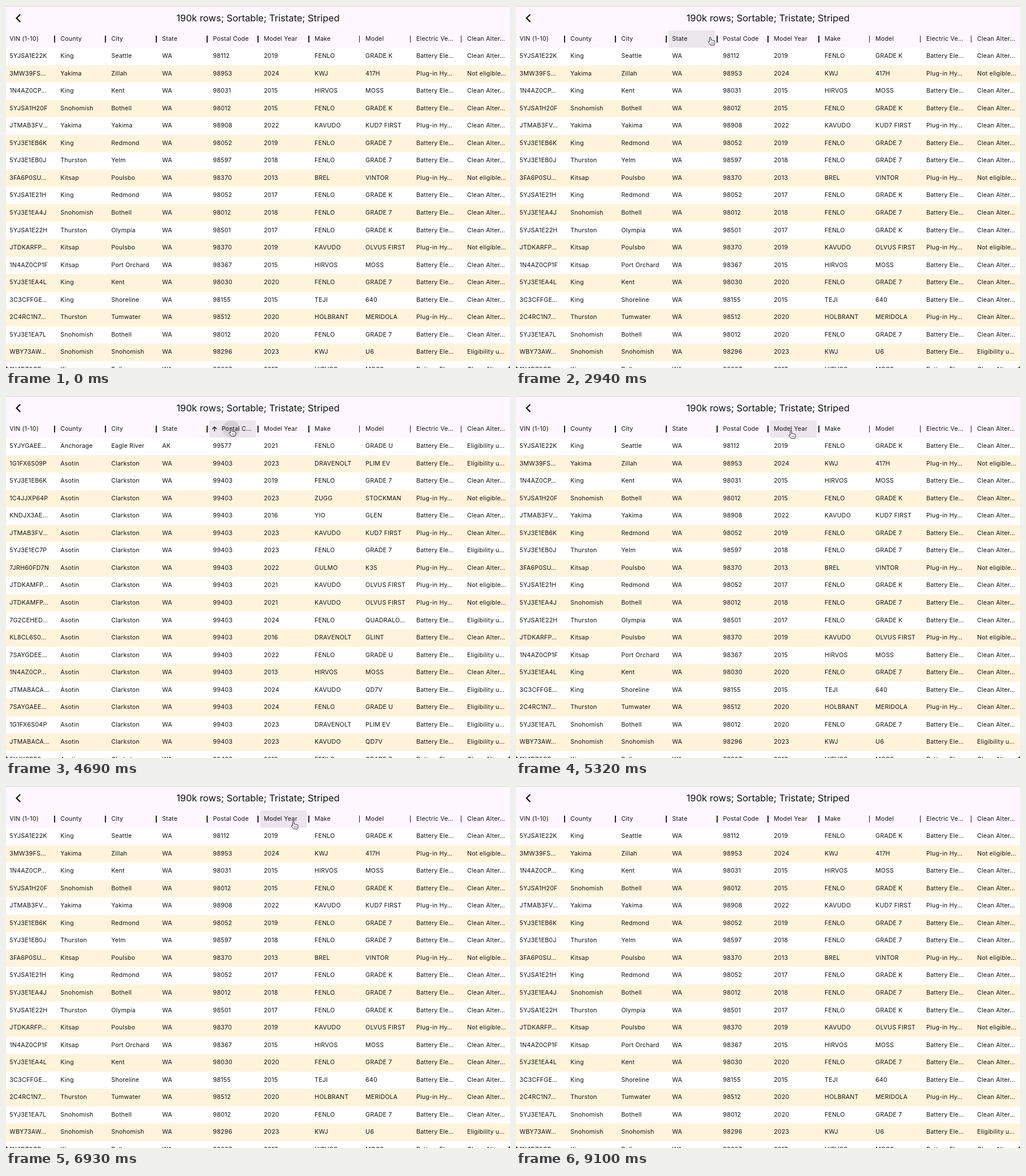
Write an HTML page that moves like this. It is 882x635 px and loops after 9.8 s.

```html
<!DOCTYPE html>
<html lang="en">
<head>
<meta charset="utf-8">
<title>Sortable table</title>
<style>
  html, body { margin: 0; width: 100%; height: 100%; overflow: hidden; background: #222; }
  #stage {
    position: relative; width: 882px; height: 635px; overflow: hidden;
    background: #fff; border-radius: 0 0 5px 5px; color: #111;
    font: 10.6px Inter, Roboto, sans-serif; letter-spacing: .2px;
  }
  #stage div, #stage span, #stage svg { position: absolute; white-space: pre; }
  #bar { left: 0; top: 0; width: 882px; height: 73px; background: #fef7ff; box-shadow: inset 0 1px #d8d3da; }
  #title { left: 0; top: 6px; width: 882px; line-height: 31px; text-align: center; font-size: 16.4px; letter-spacing: 0; }
  #hover { top: 43px; width: 81.3px; height: 30px; overflow: hidden; background: #ebe5ec; }
  #ripple { width: 30px; height: 30px; border-radius: 50%; background: rgba(29, 27, 32, .1); }
  .head { top: 43px; line-height: 30px; overflow: hidden; text-overflow: ellipsis; }
  .sep { top: 52px; width: 1.3px; height: 12px; background: #222; }
  .row { left: 0; width: 882px; height: 30.53px; line-height: 30.53px; }
  .row:nth-child(even) { background: #fff4db; }
  svg { left: 0; top: 0; overflow: visible; }
</style>
</head>
<body>
<div id="stage">
  <div id="bar"></div>
  <div id="hover"><div id="ripple"></div></div>
  <div id="title">190k rows; Sortable; Tristate; Striped</div>
  <svg width="882" height="635" style="z-index:2" fill="none" stroke-linejoin="round">
    <path d="M25 14.7 18.4 21.3 25 27.9" stroke="#111" stroke-width="2.2" stroke-linejoin="miter"/>
    <path id="sortArrow" d="M0 4V-3.7M-3.8 0 0-3.8 3.8 0" stroke="#111" stroke-width="1.3" stroke-linejoin="miter"/>
    <g id="hand" fill="#fff" stroke="#111" stroke-width=".9">
      <path d="M-1.3 8V1.2A1.25 1.25 0 0 1 1.2 1.2V5Q3.4 4.2 3.6 5.4 5.6 4.7 5.8 6 8 5.5 8 7.3V9.5Q8 11 7 13.3H.3Q-.5 11.5-3.4 9-4.2 7.6-2.9 7.2-2.2 7.1-1.3 8Z"/>
      <path d="M1.6 8.6V11M3.5 8.6V11M5.4 8.6V11" stroke-width=".6"/>
    </g>
    <path id="pointer" d="M0 0V12L2.8 9.4 4.6 13.4 6.4 12.6 4.6 8.8H8.4Z" fill="#111" stroke="#fff" stroke-width=".9"/>
  </svg>
</div>
<script>
const LOOP = 9800, TICK = 70, COL = 88.97, ROW = 30.53, TOP = 73.2, ROWS = 19;
const $ = id => document.getElementById(id);
const stage = $('stage');

const heads = ['VIN (1-10)', 'County', 'City', 'State', 'Postal Code', 'Model Year', 'Make', 'Model', 'Electric Ve…', 'Clean Alter…'];
const cars = {
  s: 'FENLO/GRADE K', d: 'FENLO/GRADE 7', y: 'FENLO/GRADE U', c: 'FENLO/QUADRALO…', o: 'FENLO/SPRINTAL',
  b: 'KWJ/417H', i: 'KWJ/U6', l: 'HIRVOS/MOSS', r: 'KAVUDO/KUD7 FIRST', p: 'KAVUDO/OLVUS FIRST',
  z: 'KAVUDO/QD7V', w: 'KAVUDO/KUD7', f: 'BREL/VINTOR', g: 'BREL/DRIMER', t: 'TEJI/640',
  h: 'HOLBRANT/MERIDOLA', e: 'DRAVENOLT/PLIM EV', k: 'DRAVENOLT/GLINT', u: 'DRAVENOLT/K-30 PICKUP',
  j: 'ZUGG/STOCKMAN', n: 'YIO/GLEN', v: 'GULMO/K35', a: 'AFUNO/XQR', m: 'AGLO VEN…/VIRELO'
};
const labels = { B: 'Battery Ele…', P: 'Plug-in Hy…', C: 'Clean Alter…', N: 'Not eligible…', E: 'Eligibility u…' };

// Fields: vin, county, city, zip, year, car, flags, state. An empty field repeats the row above.
function parse(text) {
  let last = ['', '', '', '', '', '', '', 'WA'];
  return text.trim().split('\n').map(line => {
    const f = line.split(',');
    return last = last.map((old, i) => f[i] || old);
  });
}

const base = parse(`
5YJSA1E22K,King,Seattle,98112,2019,s,BC
3MW39FS…,Yakima,Zillah,98953,2024,b,PN
1N4AZ0CP…,King,Kent,98031,2015,l,BC
5YJSA1H20F,Snohomish,Bothell,98012,2015,s
JTMAB3FV…,Yakima,Yakima,98908,2022,r,PC
5YJ3E1EB6K,King,Redmond,98052,2019,d,BC
5YJ3E1EB0J,Thurston,Yelm,98597,2018
3FA6P0SU…,Kitsap,Poulsbo,98370,2013,f,PN
5YJSA1E21H,King,Redmond,98052,2017,s,BC
5YJ3E1EA4J,Snohomish,Bothell,98012,2018,d
5YJSA1E22H,Thurston,Olympia,98501,2017,s
JTDKARFP…,Kitsap,Poulsbo,98370,2019,p,PN
1N4AZ0CP1F,Kitsap,Port Orchard,98367,2015,l,BC
5YJ3E1EA4L,King,Kent,98030,2020,d
3C3CFFGE…,King,Shoreline,98155,2015,t
2C4RC1N7…,Thurston,Tumwater,98512,2020,h,PC
5YJ3E1EA7L,Snohomish,Bothell,98012,2020,d,BC
WBY73AW…,Snohomish,Snohomish,98296,2023,i,BE
1N4BZ0CP…,King,Bellevue,98007,2017,l,BC`);

const zipDown = parse(`
5YJYGAEE…,Anchorage,Eagle River,99577,2021,y,BE,AK
1G1FX6S09P,Asotin,Clarkston,99403,2023,e,,WA
5YJ3E1EB6K,,,,2019,d,BC
1C4JJXP64P,,,,2023,j,PN
KNDJX3AE…,,,,2016,n,BC
JTMAB3FV…,,,,2023,r,PC
5YJ3E1EC7P,,,,,d,BE
7JRH60FD7N,,,,2022,v,PC
JTDKAMFP…,,,,2021,p,PN
JTDKAMFP…
7G2CEHED…,,,,2024,c,BE
KL8CL6S0…,,,,2016,k,BC
7SAYGDEE…,,,,2022,y,BE
1N4AZ0CP…,,,,2013,l,BC
JTMABACA…,,,,2024,z,BE
7SAYGAEE…,,,,,y
1G1FX6S04P,,,,2023,e
JTMABACA…,,,,,z
5YJXCBE2…,,,,2018,d,BC`);

const yearUp = parse(`
1GCDE14H…,Snohomish,Marysville,98270,1997,u,BC
1FTZR1078W,Clallam,Sequim,98382,1998,g
1FTZR0812X,Pierce,Graham,98338,1999
1FTZR0812X,Skagit,Mount Vern…,98274
1FTZR0819X,Whatcom,Deming,98244
1FTZR0813X,Pierce,Graham,98338
1FTZR0818X,San Juan,Eastsound,98245
1FTZR0879Y,Whatcom,Everson,98247,2000
1FTZR0816Y,King,Shoreline,98133
1FTZR0813Y,Whatcom,Everson,98247
1FTZR0817Y,King,Seattle,98117
1FTZR0819Y,,Shoreline,98133
1FTZR0816Y,Thurston,Olympia,98506
1FTZR0870Y,San Juan,Friday Harb…,98250
JT3GS10V02,Clallam,Sequim,98382,2002,w
JT3GS10V32,King,Sammamish,98075
JT3GS10VX3,San Juan,Friday Harb…,98250,2003
5YJRE11B08,Kitsap,Port Orchard,98367,2008,o
5YJRE1B78…,Kitsap,Kingston,98346`);

const makeUp = parse(`
4W5KHNR…,King,Tukwila,98188,2024,a,BE
ZASPATDW…,,Bellevue,98005,,m,PC
ZASPATCW…,,Seattle,98122
ZASPATDW…
ZASPATDW…,Kitsap,Port Orchard,98366
ZASPATDW…,Snohomish,Marysville,98270
ZASPATCW…,King,Woodinville,98072
ZASPATCW…,Kitsap,Bainbridge …,98110
ZASPATDW…,King,Kirkland,98033
ZASPATCW…
ZASPATDW…,,Seattle,98115
ZASPATDW…,,,98177
ZASPATCW…,,Kirkland,98033
ZASPATCW…,,Seattle,98122
ZASPATDW…,Snohomish,Monroe,98272
ZASPATDW…,,Bothell,98012
ZASPATCW…,Clark,Ridgefield,98642
ZASPATCW…,Snohomish,Bothell,98021
ZASPATCW…,King,Kirkland,98033`);

const derive = (step, change) => base.map((_, i) => {
  const row = [...base[(i * step + 5) % ROWS]];
  change(row, i);
  return row;
});
const settle = list => {
  const places = list.split(';').map(p => p.split(','));
  return (row, i) => {
    const [county, city, zip, state] = places[Math.floor(i * places.length / ROWS)];
    Object.assign(row, { 1: county, 2: city, 3: zip, 7: state });
  };
};

const views = {
  none: base,
  '3up': derive(7, settle('Anchorage,Eagle River,99577,AK;Madison,Huntsville,35806,AL;Pulaski,Little Rock,72204,AR;Maricopa,Phoenix,85032,AZ;Pima,Tucson,85718,AZ;Alameda,Oakland,94610,CA;Orange,Irvine,92620,CA;San Diego,San Diego,92101,CA')),
  '3down': derive(5, (row, i) => { if (!i) settle('Laramie,Cheyenne,82001,WY')(row, 0); }),
  '4up': derive(4, settle('Worcester,Shrewsbury,1545,MA;New London,Groton,6340,CT;Kings,Brooklyn,11201,NY;Howard,Columbia,21044,MD;Fairfax,Fairfax,22030,VA;Wake,Raleigh,27606,NC')),
  '4down': zipDown,
  '5up': yearUp,
  '5down': derive(3, row => { row[4] = '2025'; row[5] = 'i'; row[0] = 'WBY43HD…'; row[6] = 'BE'; }),
  '6up': makeUp,
  '6down': derive(8, row => { row[5] = 'v'; row[0] = '7JRH60FD…'; row[6] = 'PC'; })
};

function add(parent, tag, cls, style, text = '') {
  const el = document.createElement(tag);
  el.className = cls;
  el.textContent = text;
  Object.assign(el.style, style);
  return parent.appendChild(el);
}
const textX = col => 6.3 + COL * col;
const px = v => v + 'px';

const tables = {};
for (const key in views) {
  const table = tables[key] = add(stage, 'div', '', {});
  views[key].forEach(([vin, county, city, zip, year, car, flags, state], i) => {
    const row = add(table, 'div', 'row', { top: px(TOP + ROW * i) });
    [vin, county, city, state, zip, year, ...cars[car].split('/'), labels[flags[0]], labels[flags[1]]]
      .forEach((text, col) => add(row, 'span', '', { left: px(textX(col)) }, text));
  });
}
const headEls = heads.map((text, col) => {
  if (col) add(stage, 'div', 'sep', { left: px(COL * col - 4.6) });
  return add(stage, 'span', 'head', { left: px(textX(col)) }, text);
});

// Each column is clicked three times: [press, sorted, ripple gone].
const clicks = [
  [3, [1330, 1540, 1540], [1820, 2100, 2240], [2380, 2660, 2730]],
  [4, [3360, 3640, 3710], [3920, 4270, 4410], [4690, 4900, 5040]],
  [5, [5460, 5740, 5880], [6090, 6370, 6510], [6580, 6790, 6930]],
  [6, [7350, 7630, 7700], [7840, 8120, 8260], [8400, 8610, 8680]]
].flatMap(([col, ...list]) => list.map(([press, sorted, gone], n) =>
  ({ col, press, sorted, gone, dir: ['up', 'down', ''][n] })));

const path = [
  [70, 872, 618], [280, 600, 350], [490, 180, 110], [630, 16, 24], [840, 110, 50], [1050, 285, 60],
  [1190, 300, 57], [2800, 300, 57], [2940, 340, 55], [3220, 394, 57], [5040, 394, 57],
  [5390, 503, 62], [6930, 503, 62], [7280, 558, 58.5], [8680, 558, 58.5], [8750, 617, 56],
  [8820, 617, 56], [8890, 640, 150], [8960, 420, 330], [9030, 38, 533], [9100, 38, 533]
];

function cursorAt(t) {
  if (t < path[0][0] || t >= path.at(-1)[0]) return null;
  const n = path.findIndex(p => p[0] > t);
  const [t0, x0, y0] = path[n - 1], [t1, x1, y1] = path[n];
  const k = (t - t0) / (t1 - t0);
  return { x: x0 + (x1 - x0) * k, y: y0 + (y1 - y0) * k };
}
const show = (el, on) => { el.style.display = on ? '' : 'none'; };
const place = (el, x, y, extra = '') => el.setAttribute('transform', `translate(${x} ${y})${extra}`);

function draw(t) {
  const done = clicks.filter(c => c.sorted <= t).at(-1);
  const sort = done && done.dir ? done : null;
  const key = sort ? sort.col + sort.dir : 'none';
  for (const k in tables) show(tables[k], k === key);

  headEls.forEach((el, col) => {
    const active = sort && sort.col === col;
    el.style.left = px(textX(col) + (active ? 15 : 0));
    el.style.maxWidth = active ? '56px' : 'none';
  });
  show($('sortArrow'), sort);
  // Ascending order carries a downward arrow.
  if (sort) place($('sortArrow'), COL * sort.col + 9, 58, sort.dir === 'up' ? ' rotate(180)' : '');

  const cur = cursorAt(t);
  const inHead = cur && cur.y >= 43 && cur.y < 73;
  const col = cur ? Math.floor(cur.x / COL) : 0;
  const hovered = inHead && cur.x - col * COL < 81.3;
  show($('hover'), hovered);
  show($('hand'), inHead);
  show($('pointer'), cur && !inHead);
  if (!cur) return;
  place(inHead ? $('hand') : $('pointer'), cur.x, cur.y);
  $('hover').style.left = px(COL * col);

  const pressed = clicks.find(c => c.press <= t && t < c.gone);
  show($('ripple'), pressed);
  $('ripple').style.left = px(cur.x - COL * col - 15);
  $('ripple').style.top = px(cur.y - 57);
}

function frame() {
  const t = performance.now() % LOOP;
  draw(Math.floor(t / TICK) * TICK);
  requestAnimationFrame(frame);
}
frame();
</script>
</body>
</html>
```
